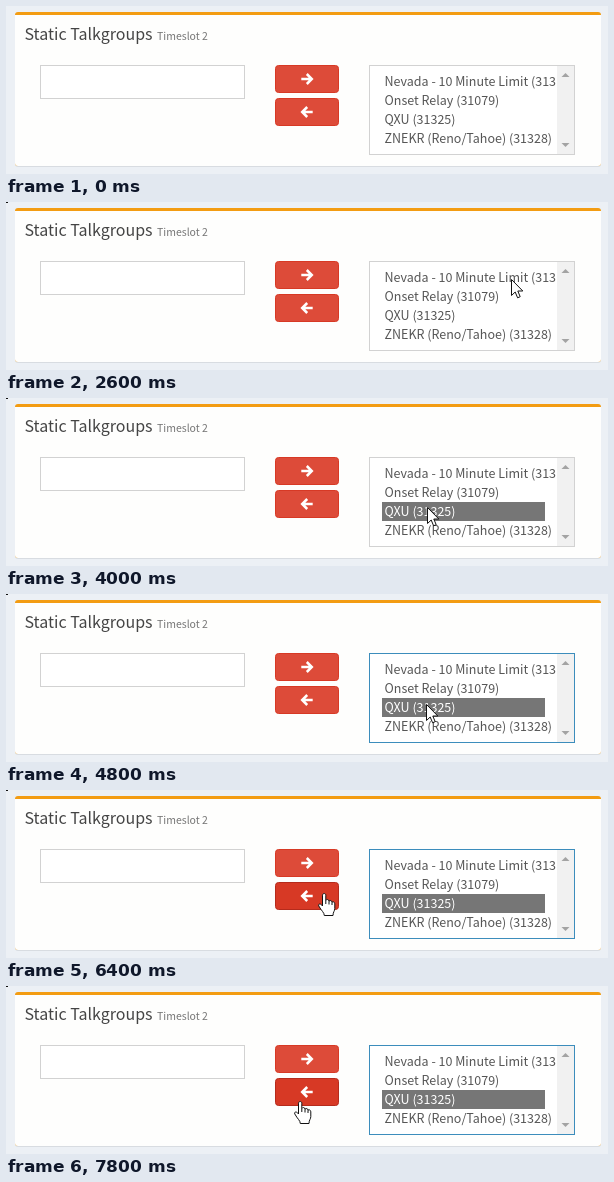
Write an HTML page that moves like this. It is 602 px wide and 168 px high and loops after 8000 ms.

```html
<!DOCTYPE html>
<html lang="en">
<head>
<meta charset="utf-8">
<title>Static Talkgroups</title>
<style>
  html, body { margin: 0; width: 100%; height: 100%; overflow: hidden; background: #ecf0f5; }
  svg { display: block; width: 100%; height: 100%; }
  text { font: 12.5px "Noto Sans CJK SC", "Noto Sans CJK JP", "Noto Sans CJK", "Lato", sans-serif; fill: #555; white-space: pre; }
  .title { font-size: 16px; fill: #444; }
  .note { font-size: 10.5px; fill: #777; }
  .field { fill: #fff; stroke: #d2d2d2; }
  .button { fill: #dd4b39; stroke: #d73925; }
  .button.hover { fill: #d73925; stroke: #b52b1c; }
  .glyph { fill: none; stroke: #fff; stroke-width: 2.5; }
  .pointer { fill: #fff; stroke: #111; stroke-linejoin: round; }
  #list.focus { stroke: #3c8dbc; }
</style>
</head>
<body>
<svg viewBox="0 0 602 168">
  <defs>
    <path id="glyph" d="M-5.7 0H4.5M-.2 -5L4.8 0L-.2 5"/>
    <clipPath id="listClip"><rect x="364" y="60" width="187" height="88"/></clipPath>
  </defs>

  <rect x="9" y="7" width="586" height="154" rx="3" fill="#d8dce1"/>
  <rect x="9" y="6" width="586" height="154" rx="3" fill="#f39c12"/>
  <path d="M9 9H595V157a3 3 0 0 1-3 3H12a3 3 0 0 1-3-3Z" fill="#fefefd"/>
  <rect id="speck" width="2" height="1" fill="#111"/>

  <text class="title" x="18.5" y="34">Static Talkgroups</text>
  <text class="note" x="151" y="34">Timeslot 2</text>

  <rect class="field" x="34.5" y="59.5" width="204" height="33"/>
  <rect class="button" x="269.5" y="59.5" width="63" height="27" rx="3"/>
  <use class="glyph" href="#glyph" transform="translate(301 73)"/>
  <rect class="button" id="remove" x="269.5" y="92.5" width="63" height="27" rx="3"/>
  <use class="glyph" href="#glyph" transform="translate(301 106) scale(-1 1)"/>

  <rect class="field" id="list" x="363.5" y="59.5" width="205" height="89"/>
  <rect x="551" y="60" width="17" height="88" fill="#f1f1f1"/>
  <path d="M555.5 71L559.5 67L563.5 71ZM555.5 137L559.5 141L563.5 137Z" fill="#a3a3a3"/>
  <rect id="selection" x="376" y="104" width="163" height="19" fill="#767676"/>
  <g id="options" clip-path="url(#listClip)"></g>

  <path class="pointer" id="arrow" d="M.5 .5V16.5L4.2 13L6.6 18.8L9.2 17.7L6.8 12H11.8Z"/>
  <g class="pointer" id="hand">
    <path d="M4.5 13V2.2C4.5 0 7.8 0 7.8 2.2V7.5C8.5 6 11 6.3 11 8.2C12 7 14 7.5 14 9.2C15 8.3 16.8 9 16.8 10.8V15.5C16.8 18 15 19 15 22.5H6.3C6.3 19.5 3.5 18 .8 13C-.2 11 2.5 9.8 4.5 13Z"/>
    <path d="M7.8 7.5V11M11 8.2V11.5M14 9.2V12" fill="none"/>
  </g>
</svg>
<script>
const LOOP = 8000, STEP = 200;
const ENTER = 2000, SELECT = 4000, FOCUS = 4200, HOVER = 6400;
const get = id => document.getElementById(id);

// Pointer stops: time, x, y
const stops = [
  [2000, 594, 95], [2600, 505, 77], [3000, 451, 92], [3400, 447, 93],
  [4000, 421, 109], [4200, 420, 110], [4800, 420, 110], [5800, 417, 115],
  [6000, 408, 116], [6200, 358, 112], [6400, 312, 103], [6600, 301, 100],
  [7400, 301, 100], [7600, 295, 107], [7800, 288, 115]
];

const options = [
  "Nevada - 10 Minute Limit (313",
  "Onset Relay (31079)",
  "QXU (31325)",
  "ZNEKR (Reno/Tahoe) (31328)"
].map((label, row) => {
  const text = document.createElementNS("http://www.w3.org/2000/svg", "text");
  text.setAttribute("x", 378.5);
  text.setAttribute("y", 80 + 19 * row);
  text.textContent = label;
  get("options").append(text);
  return text;
});

function pointerAt(t) {
  const next = stops.findIndex(stop => stop[0] > t);
  if (next < 0) return stops.at(-1).slice(1);
  if (next === 0) return stops[0].slice(1);
  const [t0, x0, y0] = stops[next - 1], [t1, x1, y1] = stops[next];
  const k = (t - t0) / (t1 - t0);
  return [Math.round(x0 + (x1 - x0) * k), Math.round(y0 + (y1 - y0) * k)];
}

const show = (id, visible) => get(id).setAttribute("visibility", visible ? "visible" : "hidden");

function draw(time) {
  const t = Math.floor(time % LOOP / STEP) * STEP;
  const place = `translate(${pointerAt(t)})`;
  get("arrow").setAttribute("transform", place);
  get("hand").setAttribute("transform", place);
  show("speck", t >= STEP);
  show("arrow", t >= ENTER && t < HOVER);
  show("hand", t >= HOVER);
  show("selection", t >= SELECT);
  options[2].style.fill = t >= SELECT ? "#fff" : "";
  get("list").classList.toggle("focus", t >= FOCUS);
  get("remove").classList.toggle("hover", t >= HOVER);
}

const start = performance.now();
function tick() {
  draw(performance.now() - start);
  requestAnimationFrame(tick);
}
tick();
</script>
</body>
</html>
```
